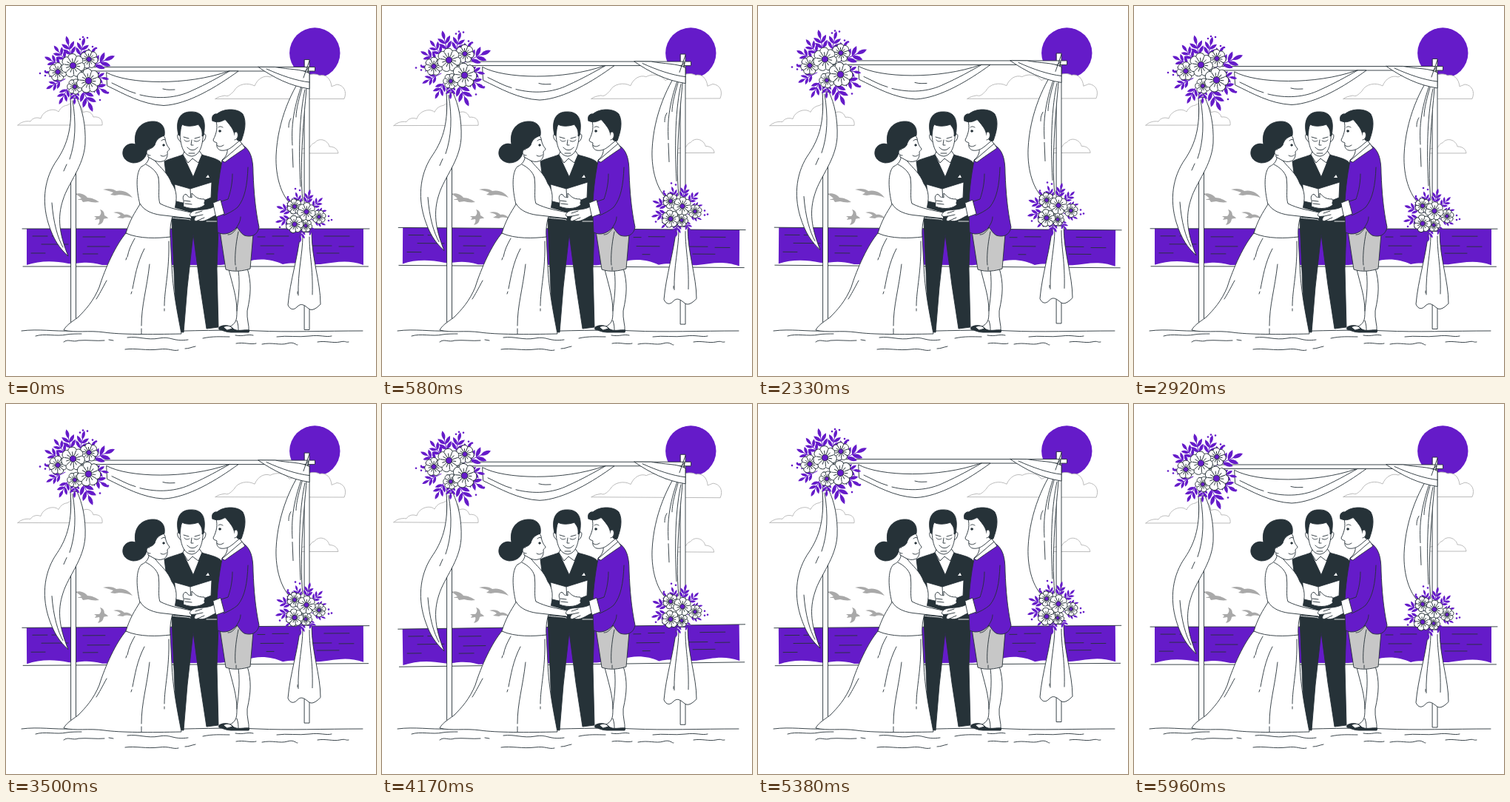
An HTML page that plays this animation: 500 by 500 pixels, repeating every 6 s.

```html
<!DOCTYPE html>
<html lang="en">
<head>
<meta charset="utf-8">
<title>Beach wedding</title>
<style>
html, body { margin: 0; width: 100%; height: 100%; overflow: hidden; background: #fff }
svg { display: block; width: 100%; height: 100% }
path, rect, circle { stroke: #263238; stroke-width: .9; stroke-linecap: round; stroke-linejoin: round; fill: #fff }
.line { fill: none }
.dark { fill: #263238 }
.purple { fill: #651bc9 }
.plain { stroke: none }
.grey { fill: #c7c7c7 }
#clouds path { stroke: #b4b4b4 }
#birds path { fill: #a9a9a9; stroke: none }
</style>
</head>
<body>
<svg viewBox="0 0 500 500">
  <circle class="purple plain" cx="417.3" cy="63.5" r="34.2"/>

  <g id="clouds">
    <path d="M16 161H130C131 153 126 149 118 150C116 143 109 141 104 144C104 133 92 127 83 134C76 135 73 139 71 143C65 137 50 141 47 152C42 150 36 151 33 156C26 155 20 157 16 161Z"/>
    <path d="M283 125.500H457C461 116 457 107 447 106C443 108 441 108 440 109C439 98 432 92 424 94C417 90 405 92 400 100C391 98 387 99 383 101C377 92 364 92 357 96C349 93 340 98 336 108C327 103 313 105 308 115C303 120 300 123 296 121C290 122 286 123 283 125.500Z"/>
    <path d="M394 199H449C448 192 442 190 437 190C435 181 423 177 417 185C412 186 412 191 408 193C402 191 397 194 394 199Z"/>
  </g>

  <g id="birds">
    <path d="M93 254C101 252 107 255 110 259C116 259 122 262 126 265C120 266 115 265 111 264L104 265L102 262L96 262L102 260C99 257 96 255 93 254Z"/>
    <path d="M131 248C139 246 145 247 149 250C158 248 166 252 171 259C164 256 158 255 153 255L147 256L141 255L145 252C140 250 136 249 131 248Z"/>
    <path d="M127 275C132 276 133 280 133 283C135 284 137 285 138 287C135 287 133 287 132 288C131 293 129 295 124 296C126 293 127 290 126 288L120 289L122 286L119 284L126 284C129 281 129 278 127 275Z"/>
    <path d="M145 279C152 277 157 279 160 282C165 281 170 284 172 288C166 285 162 285 158 287L150 286L155 283C152 280 149 280 145 279Z"/>
  </g>

  <g id="sea">
    <path class="purple plain" d="M28 301H483V350C460 342 445 347 425 349C400 350 392 345 374 349C360 342 340 340 325 346L290 350H130C105 343 95 350 84 348C65 344 45 344 28 350Z"/>
    <path class="line" d="M22 301H491M23 352H489.500M36 311H56M62 311H70M104 312H134M48 322H84M110 325H140M34 334H53M104 335H124M340 312H350M360 311H382M430 311H464M344 324H375M412 324H440M450 325H470M352 335H362M420 334H450"/>
  </g>

  <path class="line" d="M21 439C45 436 64 440 90 439S150 441 200 440S300 437 340 439S430 439 482 439M40 446C52 442 68 447 82 444C88 443 96 443 102 443M78 454C84 449 90 455 98 452C110 451 122 453 133 452M139 451L145 452M164 448C180 446 190 452 207 449S225 454 246 451M161 464C175 462 190 466 206 464S225 467 233 465M242 463C248 463 250 461 256 460M266 449C280 446 290 447 302 447M310 445C322 447 325 443 334 445M311 456C322 454 330 458 338 456M346 457C360 454 370 459 380 456S392 459 394 458M366 447C380 445 395 448 410 446S432 448 440 446M421 454C432 452 442 456 451 454S458 455 463 454"/>

  <g id="arch">
    <rect x="88" y="100" width="6.500" height="337"/>
    <rect x="403.500" y="72.500" width="6.500" height="365"/>
    <rect x="88" y="82.500" width="329.500" height="5.500"/>
    <path d="M136 90C165 106 245 108 301 88L314 88C285 109 246 133 213 134.500C184 133 160 119 137 108Z"/>
    <path class="line" d="M143 104C154 109 164 115 175 118M181 120C205 126 230 125 252 114C270 106 288 96 302 88M212 112C219 114 224 113 228 113"/>
    <path d="M408 84C386 112 367 155 365 202C364 231 372 256 386 269L401 263C396 215 403 140 409 84Z"/>
    <path class="line" d="M406 90C390 130 385 157 387 188M387 193L388 218M385 152C382 157 382 161 382 164M404 113C397 145 395 190 398 244M409 84C397 118 392 139 392 150"/>
    <path d="M341 82.500C362 97 384 108 410 112L410 91C400 85 382 86 364 82.500Z"/>
    <path class="line" d="M352 85C372 94 392 101 410 103M410 74L402 97"/>
    <path d="M398 306C394 343 384 370 381 404C384 411 389 411 393 407C399 400 404 405 409 409C414 413 420 408 425 403C425 372 413 342 413 306Z"/>
    <path class="line" d="M401 311C401 335 394 359 395 391M410 312C410 339 415 352 414 390M394 386V389"/>
    <path d="M87 125C90 164 83 187 69 208C52 232 48 263 57 293C64 316 73 328 84 338C72 308 69 286 77 262C84 239 105 217 107 186C108 160 103 140 96 125Z"/>
    <path class="line" d="M90 128C95 158 94 184 86 207M82 214L78 223M62 266C64 293 70 314 77 326"/>
    <g id="flowers"></g>
  </g>

  <g id="officiant">
    <path class="dark" d="M239 201C228 205 219 207 214 210L224 289L229 405L231 440L240 441L245 380L253 308L262 377L271 436L287 434L285 355L287 300L294 220C293 209 287 207 264 201Z"/>
    <path d="M242 194L239 201L253 231L265 201L260 194Z"/>
    <path class="line" d="M239 201L246 212L252 206L260 212L265 201"/>
    <path d="M236 174C230 169 230 181 237 184M266 174C272 169 271 182 265 184"/>
    <path d="M235 160C234 187 239 202 251 203C263 202 268 185 266 160Z"/>
    <path class="dark" d="M233 174C228 152 237 143 249 143C266 142 271 154 267 175L265 176C266 166 262 164 260 160C252 163 243 163 238 160C236 164 236 169 235 175Z"/>
    <path class="line" d="M240 177L247 179M255 179L262 177M241 181C243 184 246 183 248 182M254 182C257 184 260 183 262 181M251 181L250 188L253 188M245 191C249 196 255 196 259 191M247 199H255"/>
    <path class="plain" d="M270 232L273 228L275 232Z"/>
    <path d="M228 241L249 247L278 238L277 259L252 269L230 264Z"/>
    <path class="line" d="M249 247L250 264"/>
    <path d="M240 263C237 256 243 252 245 256C246 259 249 258 251 259L251 253C256 257 257 261 268 261C270 265 266 266 269 268C265 273 253 276 240 271Z"/>
    <path class="line" d="M241 263L249 264M242 267L251 268"/>
    <path class="line" style="stroke:#fff" d="M224 286C235 288 242 287 249 289M271 291L286 291"/>
  </g>

  <g id="bride">
    <path d="M162 307C149 322 134 354 126 380C118 399 108 410 97 421C87 428 81 432 78 438C94 442 112 438 133 441S195 444 237 443C232 416 225 383 224 350L222 311Z"/>
    <path class="line" d="M174 314C169 323 166 329 164 339M163 340L162 343M187 328C177 347 174 367 171 382M170 386L169 389M194 349C190 384 183 404 183 432M183 436V443M220 318C221 358 214 383 214 405M214 409V412M136 371C130 382 126 390 122 396"/>
    <path d="M193 202C194 208 190 214 183 217C175 225 176 248 181 268C174 279 167 290 162 307C180 315 205 314 222 312C221 298 224 286 227 278C232 260 231 249 224 240C219 226 209 219 202 210Z"/>
    <path d="M203 169C206 167 213 173 215 179C216 185 217 188 221 193C221 195 218 196 218 197C219 204 216 209 211 210C207 211 204 210 201 209L192 204L191 184Z"/>
    <path class="dark" d="M175 187C172 170 180 157 197 156C209 155 216 163 214 175C206 178 203 181 201 188C198 193 194 192 191 195C190 204 184 212 172 212C162 211 155 203 159 193C163 186 170 185 175 187Z"/>
    <path d="M194 194C189 193 188 202 195 202"/>
    <path class="line" d="M210 182C212 180 214 180 215 181M209 202C212 204 215 203 217 201"/>
    <circle class="dark" cx="213" cy="188" r="1.200"/>
    <path class="plain" d="M190 215C200 220 206 227 207 238L208 267L250 279L250 287L207 283L181 267Z"/>
    <path class="line" d="M181 267C187 278 201 282 214 283L249 287M206 232C208 246 205 258 208 267C222 274 236 276 250 279M189 214C197 218 204 224 206 232"/>
  </g>

  <g id="groom">
    <path d="M300 352C306 377 312 393 312 412C312 425 311 429 301 434L313 439H328C329 432 325 423 326 412C331 389 332 375 326 354Z"/>
    <path class="line" d="M314 357C317 381 313 400 312 412M312 425C314 431 314 435 314 438"/>
    <path class="dark" d="M288 434C294 430 303 431 308 437C314 440 321 437 329 438L328 441H304C297 441 293 438 288 437Z"/>
    <path d="M294 434C298 431 304 432 306 436L299 438Z"/>
    <path class="grey" d="M289 304L297 356C308 360 321 358 330 355L334 308L312 299Z"/>
    <path class="line" d="M312 300C307 307 304 309 300 309M314 305C310 323 309 341 310 350M311 353V357"/>
    <path d="M299 192C300 199 297 204 292 208L302 210L323 193L316 182Z"/>
    <path d="M284 155C286 164 285 171 280 181C280 184 284 184 285 185C284 190 286 194 290 195C296 196 301 194 306 190L318 180L314 153Z"/>
    <path class="dark" d="M279 155C277 149 281 145 285 146C294 138 313 138 320 146C326 157 322 171 318 182C313 184 310 179 309 174C307 166 304 163 301 159L296 153C291 157 284 158 279 155Z"/>
    <path d="M309 171C314 166 316 180 309 181"/>
    <path class="line" d="M287 164C289 162 291 163 293 164M285 188C288 191 291 190 294 188"/>
    <circle class="dark" cx="289" cy="169" r="1.300"/>
    <path class="purple" d="M292 209L320 188C331 195 334 207 334 226C335 252 337 275 342 299C340 310 331 313 322 310C317 307 315 302 312 299C306 306 296 311 286 306L285 285C284 257 288 230 292 209Z"/>
    <path d="M292 209L319 186L323 192C316 197 305 204 296 211Z"/>
    <path class="line" d="M327 218C326 242 323 260 313 272C307 277 301 280 294 283M306 227C306 243 302 255 300 261L291 264M311 300C315 294 317 290 317 285"/>
    <path d="M283 270C276 275 267 275 257 276C251 277 247 281 249 284C252 285 254 284 257 284C253 288 254 292 259 290C268 293 274 287 285 282Z"/>
    <path class="line" d="M257 284L266 282M256 280L265 277M259 290L268 286"/>
    <path d="M280 266L290 262L295 281L284 285Z"/>
  </g>
</svg>
<script>
const polar = (r, a) => [r * Math.cos(a), r * Math.sin(a)].map(v => v.toFixed(1));

function flower(x, y, r) {
  const petals = 7, step = 2 * Math.PI / petals;
  let outline = `M${polar(r * .82, 0)}`, veins = '';
  for (let i = 0; i < petals; i++) {
    const a = i * step;
    outline += `C${polar(r * 1.18, a + step * .15)} ${polar(r * 1.18, a + step * .85)} ${polar(r * .82, a + step)}`;
    veins += `M${polar(r * .35, a)}L${polar(r * .75, a)}M${polar(r * .35, a + step / 2)}L${polar(r * .6, a + step / 2)}`;
  }
  return `<g transform="translate(${x} ${y}) rotate(${x * 7 % 50})"><path d="${outline}Z"/>
    <path class="line" d="${veins}"/><circle class="purple" r="${r * .28}"/></g>`;
}

// A stem with paired leaves and one leaf at its tip.
function sprig(x, y, angle, length) {
  const leaf = (at, turn, size) => `<path class="purple plain" transform="translate(${at}) rotate(${turn})"
    d="M0 0Q${size * .5} ${-size * .36} ${size} 0Q${size * .5} ${size * .36} 0 0"/>`;
  const size = length * .36;
  let out = `<path class="line" style="stroke:#651bc9" d="M0 0H${length * .7}"/>` + leaf(length * .64, 0, size);
  for (const at of [.28, .48]) out += leaf(length * at, 42, size) + leaf(length * at, -42, size);
  return `<g transform="translate(${x} ${y}) rotate(${angle})">${out}</g>`;
}

const dot = ([x, y]) => `<circle class="purple plain" cx="${x}" cy="${y}" r="1.3"/>`;

function bouquet(x, y, reach, sprigs, dots, blooms) {
  return sprigs.map(([angle, k]) => {
    const [dx, dy] = polar(reach * .32, angle * Math.PI / 180);
    return sprig(x + +dx, y + +dy, angle, reach * (k - .32));
  }).join('') + dots.map(dot).join('') + blooms.map(b => flower(...b)).join('');
}

document.getElementById('flowers').innerHTML =
  bouquet(94, 91, 50,
    [[-104, 1.04], [-76, 1], [-52, .9], [-24, 1.16], [10, .92], [32, 1.05], [66, 1.14], [92, .85], [118, .95], [152, .9], [182, .85], [208, .95], [232, .95]],
    [[100, 45], [104, 42], [110, 43], [117, 55], [122, 57], [46, 91], [53, 88], [53, 94], [138, 117], [127, 127]],
    [[93, 109, 10], [70, 89, 12], [112, 72, 12], [90.5, 80.500, 15.500], [111.500, 101, 16]]) +
  bouquet(402, 284, 36,
    [[-108, .95], [-76, 1.04], [-44, 1], [-14, .9], [22, .9], [62, .9], [98, 1], [136, .95], [168, 1.08], [200, 1.08], [228, .95]],
    [[391, 247], [397, 249], [436, 284], [440, 289], [436, 290], [381, 258], [370, 299]],
    [[405, 297, 8.500], [423, 285, 9], [390, 271, 10], [406, 278, 12], [390, 295, 11.500]]);

const arch = document.getElementById('arch');
const sea = document.getElementById('sea');
const clouds = document.getElementById('clouds');

// Rises 0 to 1 and falls back linearly over each unit of p.
const triangle = p => 1 - Math.abs(1 - 2 * (p % 1));

function draw(now) {
  const t = now % 6000;
  const sway = 2 * triangle(t / 6000 + .25) - 1;
  arch.setAttribute('transform', `translate(0 ${-9.6 * triangle(t / 1500)})`);
  sea.setAttribute('transform', `rotate(${sway} 256 326)`);
  clouds.setAttribute('transform', `rotate(${-.4 * sway} 237 148)`);
}

const start = performance.now();
function tick() {
  draw(performance.now() - start);
  requestAnimationFrame(tick);
}
tick();
</script>
</body>
</html>
```
